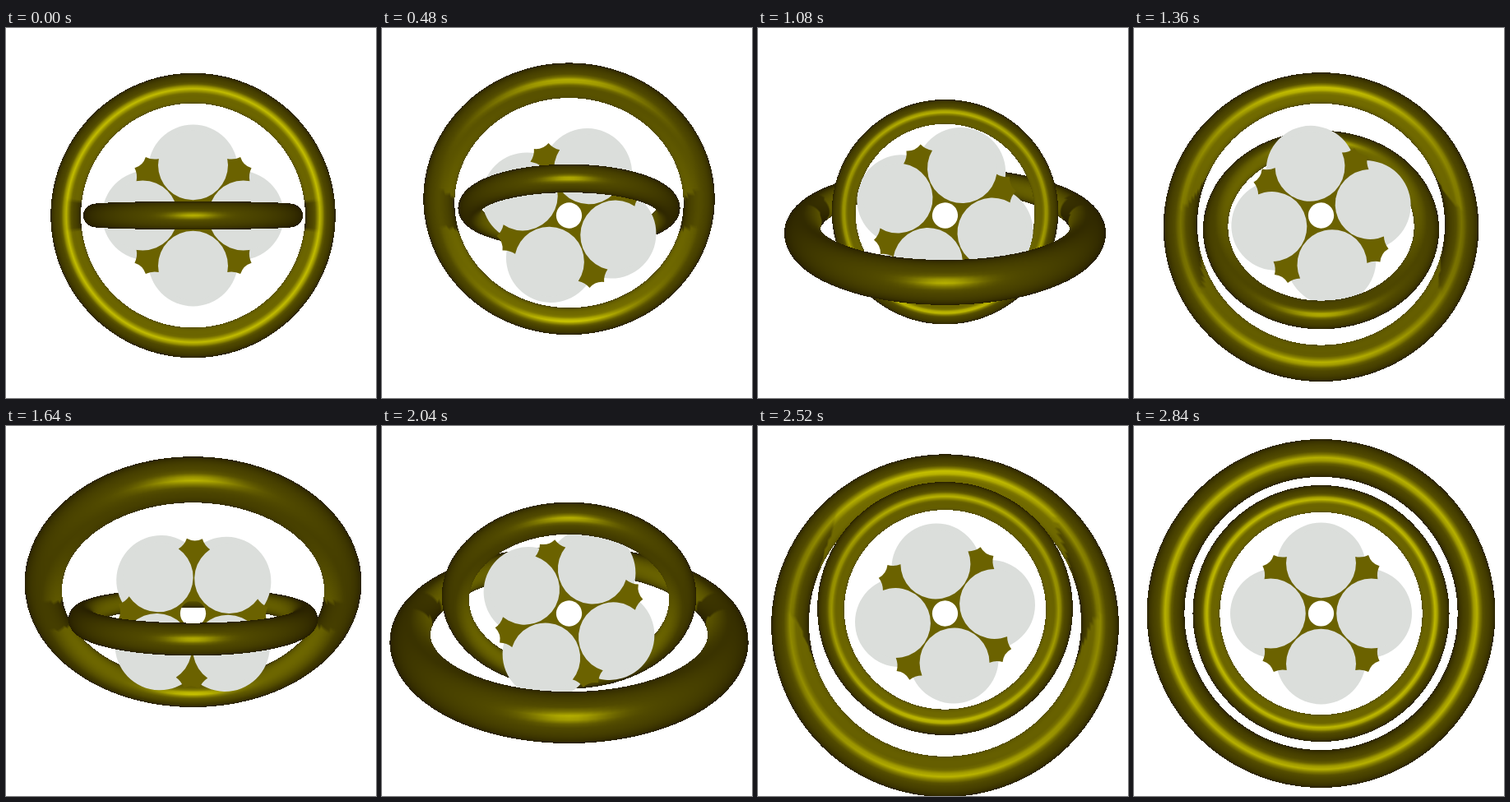
An HTML page with a canvas for the animation above (2.88 s loop, 450 by 450 pixels).

```html
<!DOCTYPE html>
<html lang="en">
<head>
<meta charset="utf-8">
<title>Gyroscope rings</title>
<style>
html, body { margin: 0; width: 100%; height: 100%; overflow: hidden; background: #fff; }
canvas { display: block; width: 450px; height: 450px; }
</style>
</head>
<body>
<canvas id="stage" width="450" height="450"></canvas>
<script>
const SIZE = 450, CX = 227.5, CY = 228;
const DIST = 510;            // eye to centre, in pixels
const STEP = 40, FRAMES = 72;
const TUBE = 0.114;          // tube radius relative to ring radius
const NU = 180, NV = 40;
const TAU = Math.PI * 2;

const ctx = document.getElementById('stage').getContext('2d');

function layer() {
  const canvas = document.createElement('canvas');
  canvas.width = canvas.height = SIZE;
  const g = canvas.getContext('2d');
  const image = g.createImageData(SIZE, SIZE);
  return { canvas, g, image, px: new Uint32Array(image.data.buffer) };
}
const back = layer(), middle = layer(), front = layer();
const depth = new Float32Array(SIZE * SIZE);

const mix = (a, b, t) => a + (b - a) * t;

function easeInOut(t) {
  const a = t ** 1.68, b = (1 - t) ** 1.68;
  return a / (a + b);
}

function gold(i) {
  const r = Math.min(255, i * 255);
  const g = Math.max(0, Math.min(255, i * 258 - 8));
  return (0xff000000 | (g << 8) | r) >>> 0;
}

// One lamp sits at the eye, another at the centre, half hidden by the cross.
function shade(x, y, z, nx, ny, nz, blocker) {
  const vz = DIST - z;
  const facing = (vz * nz - x * nx - y * ny) / Math.hypot(x, y, vz);
  const lit = Math.max(0, facing);
  const len = Math.hypot(x, y, z);
  let inner = Math.max(0, -(x * nx + y * ny + z * nz) / len);
  inner *= (x * x + y * y) / (len * len);
  if (blocker !== null) {
    const off = Math.abs(z * Math.cos(blocker) - y * Math.sin(blocker)) / len;
    if (off < TUBE) inner = 0;
  }
  return { facing, light: 0.13 + 0.2 * lit + 0.4 * lit ** 40 + 0.18 * inner };
}

function triangle(a, b, c) {
  const area = (b.x - a.x) * (c.y - a.y) - (b.y - a.y) * (c.x - a.x);
  if (Math.abs(area) < 1e-6) return;
  const x0 = Math.max(0, Math.ceil(Math.min(a.x, b.x, c.x)));
  const x1 = Math.min(SIZE - 1, Math.floor(Math.max(a.x, b.x, c.x)));
  const y0 = Math.max(0, Math.ceil(Math.min(a.y, b.y, c.y)));
  const y1 = Math.min(SIZE - 1, Math.floor(Math.max(a.y, b.y, c.y)));
  for (let y = y0; y <= y1; y++) {
    for (let x = x0; x <= x1; x++) {
      const wa = ((b.x - x) * (c.y - y) - (b.y - y) * (c.x - x)) / area;
      const wb = ((c.x - x) * (a.y - y) - (c.y - y) * (a.x - x)) / area;
      const wc = 1 - wa - wb;
      if (wa < -1e-6 || wb < -1e-6 || wc < -1e-6) continue;
      const z = wa * a.z + wb * b.z + wc * c.z;
      const i = y * SIZE + x;
      if (z <= depth[i]) continue;
      depth[i] = z;
      (z > 0 ? front : back).px[i] = gold(wa * a.light + wb * b.light + wc * c.light);
    }
  }
}

function ring(radius, tilt, blocker) {
  const c = Math.cos(tilt), s = Math.sin(tilt), r = radius * TUBE;
  const grid = [];
  for (let i = 0; i < NU; i++) {
    const cu = Math.cos(i / NU * TAU), su = Math.sin(i / NU * TAU);
    for (let j = 0; j < NV; j++) {
      const cv = Math.cos(j / NV * TAU), sv = Math.sin(j / NV * TAU);
      const w = radius + r * cv;
      const x = cu * w, y = su * w * c - r * sv * s, z = su * w * s + r * sv * c;
      const ny = su * cv * c - sv * s, nz = su * cv * s + sv * c;
      const k = DIST / (DIST - z);
      const p = shade(x, y, z, cu * cv, ny, nz, blocker);
      p.x = CX + x * k - 0.5;
      p.y = CY - y * k - 0.5;
      p.z = z;
      grid.push(p);
    }
  }
  for (let i = 0; i < NU; i++) {
    const row = i * NV, next = (i + 1) % NU * NV;
    for (let j = 0; j < NV; j++) {
      const k = (j + 1) % NV;
      const p = grid[row + j], q = grid[next + j], t = grid[next + k], u = grid[row + k];
      if (Math.max(p.facing, q.facing, t.facing, u.facing) < 0) continue;
      triangle(p, q, t);
      triangle(p, t, u);
    }
  }
}

function disc(g, x, y, r) {
  g.beginPath();
  g.arc(x, y, r, 0, TAU);
  g.fill();
}

const quarters = (g, draw) => {
  for (let k = 0; k < 4; k++) {
    draw();
    g.rotate(Math.PI / 2);
  }
};

function arm(g) {
  g.beginPath();
  g.moveTo(0, -19.5);
  g.lineTo(78, -19.5);
  g.quadraticCurveTo(83, -12, 91, -9.5);
  g.quadraticCurveTo(86, 0, 91, 9.5);
  g.quadraticCurveTo(83, 12, 78, 19.5);
  g.lineTo(0, 19.5);
  g.fill();
}

// Gold cross with four balls set into it and a hole through the middle.
function drawCross(turn) {
  const g = middle.g;
  g.setTransform(1, 0, 0, 1, 0, 0);
  g.clearRect(0, 0, SIZE, SIZE);
  g.translate(CX, CY);
  g.rotate(turn);
  g.fillStyle = '#dbdedb';
  quarters(g, () => disc(g, 56, 0, 54.5));
  g.rotate(Math.PI / 4);
  g.fillStyle = '#6b6200';
  disc(g, 0, 0, 36);
  quarters(g, () => arm(g));
  g.rotate(-Math.PI / 4);
  g.fillStyle = '#dbdedb';
  quarters(g, () => disc(g, 61.2, 0, 42.5));
  g.globalCompositeOperation = 'destination-out';
  disc(g, 0, 0, 15.6);
  g.globalCompositeOperation = 'source-over';
}

function render(n) {
  const ease = easeInOut(n / (FRAMES - 1));
  const outer = TAU * ease;
  const inner = Math.PI / 2 - TAU * 0.75 * ease;

  depth.fill(-1e9);
  back.px.fill(0);
  front.px.fill(0);
  ring(mix(154.6, 188.7, ease), outer, inner);
  ring(mix(116, 139.4, ease), inner, null);
  drawCross(TAU * ease);

  back.g.putImageData(back.image, 0, 0);
  front.g.putImageData(front.image, 0, 0);
  ctx.fillStyle = '#fff';
  ctx.fillRect(0, 0, SIZE, SIZE);
  for (const l of [back, middle, front]) ctx.drawImage(l.canvas, 0, 0);
}

const start = performance.now();
let shown = -1;
function tick() {
  const n = Math.floor((performance.now() - start) / STEP) % FRAMES;
  if (n !== shown) render(shown = n);
  requestAnimationFrame(tick);
}
tick();
</script>
</body>
</html>
```
